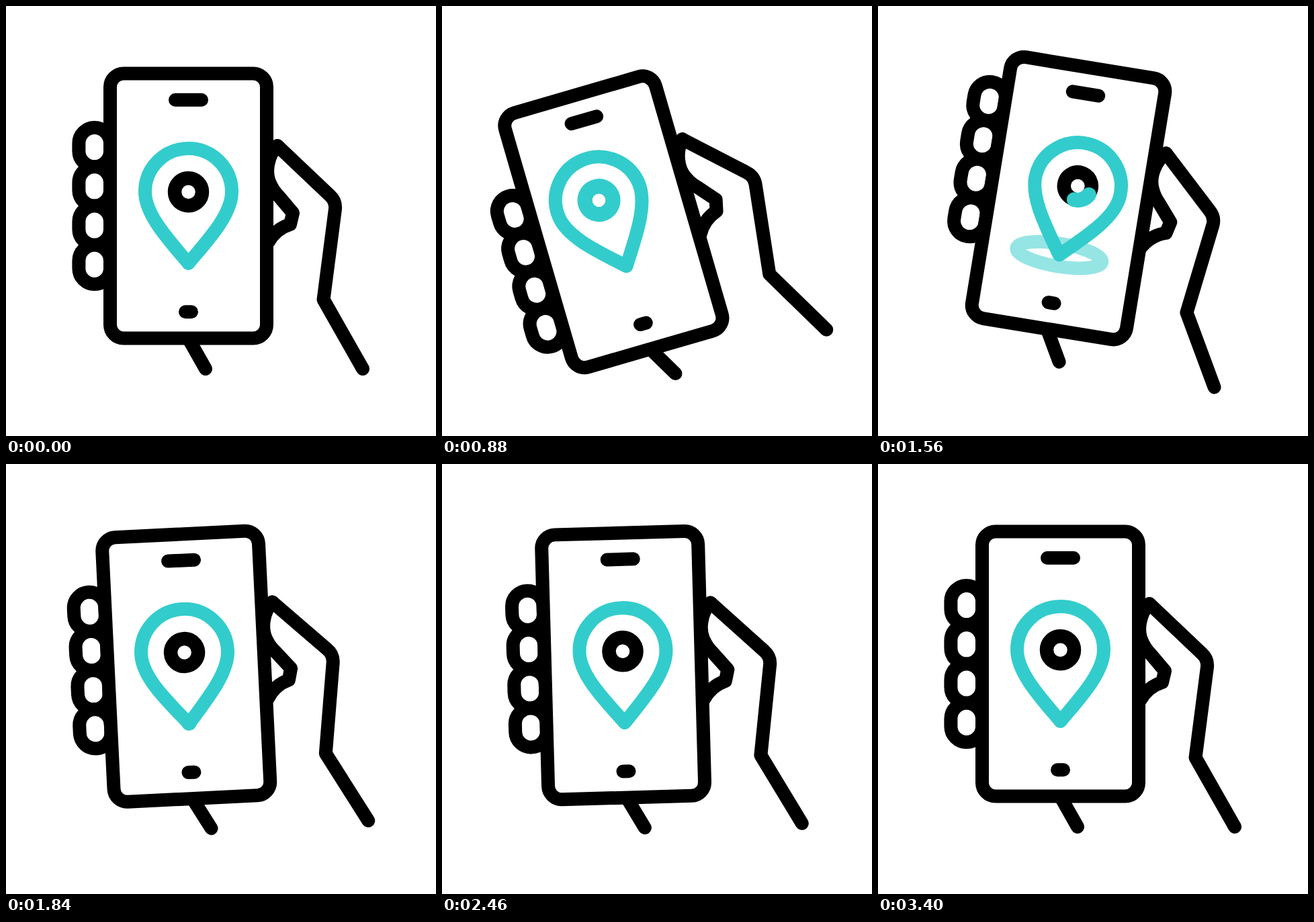
Animation, 640 px wide and 640 px high, one loop 3.6 s. Source, as an HTML page:

```html
<!DOCTYPE html>
<html lang="en">
<head>
<meta charset="utf-8">
<title>Phone location</title>
<style>
  html, body { margin: 0; width: 100%; height: 100%; overflow: hidden; background: #fff; }
  svg { display: block; width: 100vw; height: 100vh; }
  .ink, .teal { fill: none; stroke-width: 20; stroke-linecap: round; stroke-linejoin: round; }
  .ink { stroke: #000; }
  .teal { stroke: #3cc; }
</style>
</head>
<body>
<svg viewBox="0 0 640 640">
  <g id="scene">
    <g class="ink">
      <path d="M404 208L482 282Q491 290 490 302L472.5 437L531 540"/>
      <path d="M404 208C390 222 385 247 393 264C396 271 400 277 405 282L427 308L423 325C410 329 399 336 390 352"/>
      <path d="M271.5 495L297 540"/>
      <g id="fingers"></g>
      <rect x="155" y="100.5" width="233" height="394" rx="20" fill="#fff"/>
      <path d="M252 139.7H291M267 455.3H276"/>
    </g>
    <ellipse id="ripple" class="teal" cx="271.5" cy="383"/>
    <g id="pin">
      <path class="teal" d="M271.5 383C243 349 207 311 207 276.5A64.5 64.5 0 0 1 336 276.5C336 311 300 349 271.5 383Z"/>
      <circle class="ink" cx="271.5" cy="276.7" r="20.5" style="stroke-width:20.5"/>
      <path id="ring" class="teal" pathLength="100" style="stroke-width:22"
        d="M271.5 297.7A21 21 0 0 1 271.5 255.7A21 21 0 0 1 271.5 297.7"/>
    </g>
  </g>
</svg>
<script>
  const LOOP = 3600;
  const $ = id => document.getElementById(id);
  const scene = $('scene'), fingers = $('fingers'), pin = $('pin'), ring = $('ring'), ripple = $('ripple');

  // [time, value] steps
  const TILT = [[0, 0], [640, -16.2], [970, -16.2], [1640, 10.3], [1980, -10.3], [2280, 5.2], [2580, -5.2], [2920, 0]];
  const SLIDE = [[0, 0], [640, 36], [970, 36], [1640, -39], [1980, 21], [2280, -15.5], [2580, 10.8], [2920, 0]];
  const LEAN = [[0, 0], [640, -6.5], [970, -6.5], [1300, 11.8], [1840, -0.9], [2180, -0.6], [2500, 0]];
  const LIFT = [[0, 0], [640, 16.8], [970, 16.8], [1200, 0]];
  const HEAD = [[0, 0], [940, 100]];
  const TAIL = [[880, 0], [1820, 100]];
  const RIPPLES = [1140, 1810];
  const RIPPLE_MS = 520;

  for (let i = 0; i < 4; i++) {
    const r = document.createElementNS('http://www.w3.org/2000/svg', 'rect');
    const a = { x: 108.4, y: 181 + i * 58.25, width: 46.6, height: 58.25, rx: 23.3, fill: '#fff' };
    for (const k in a) r.setAttribute(k, a[k]);
    fingers.append(r);
  }

  const ease = u => u * u * (3 - 2 * u);

  function at(keys, t) {
    if (t <= keys[0][0]) return keys[0][1];
    for (let i = 1; i < keys.length; i++) {
      const [t0, a] = keys[i - 1], [t1, b] = keys[i];
      if (t < t1) return a + (b - a) * ease((t - t0) / (t1 - t0));
    }
    return keys[keys.length - 1][1];
  }

  function draw(t) {
    scene.setAttribute('transform', `rotate(${at(TILT, t)} 347 366)`);
    fingers.setAttribute('transform', `translate(0 ${at(SLIDE, t)})`);
    pin.setAttribute('transform', `translate(0 ${-at(LIFT, t)}) rotate(${at(LEAN, t)} 271.5 383)`);

    const head = at(HEAD, t), tail = at(TAIL, t), len = head - tail;
    ring.style.visibility = len > 0.1 ? 'visible' : 'hidden';
    ring.style.strokeDasharray = `${len} 200`;
    ring.style.strokeDashoffset = -tail;

    const start = RIPPLES.find(s => t > s && t < s + RIPPLE_MS);
    ripple.style.visibility = start ? 'visible' : 'hidden';
    if (start) {
      const u = (t - start) / RIPPLE_MS, rx = 71 * ease(u);
      ripple.setAttribute('rx', rx);
      ripple.setAttribute('ry', rx * 0.265);
      ripple.style.opacity = Math.min(1, (1 - u) / 0.37);
    }
  }

  const begin = performance.now();
  function tick() {
    draw((performance.now() - begin) % LOOP);
    requestAnimationFrame(tick);
  }
  draw(0);
  requestAnimationFrame(tick);
</script>
</body>
</html>
```
